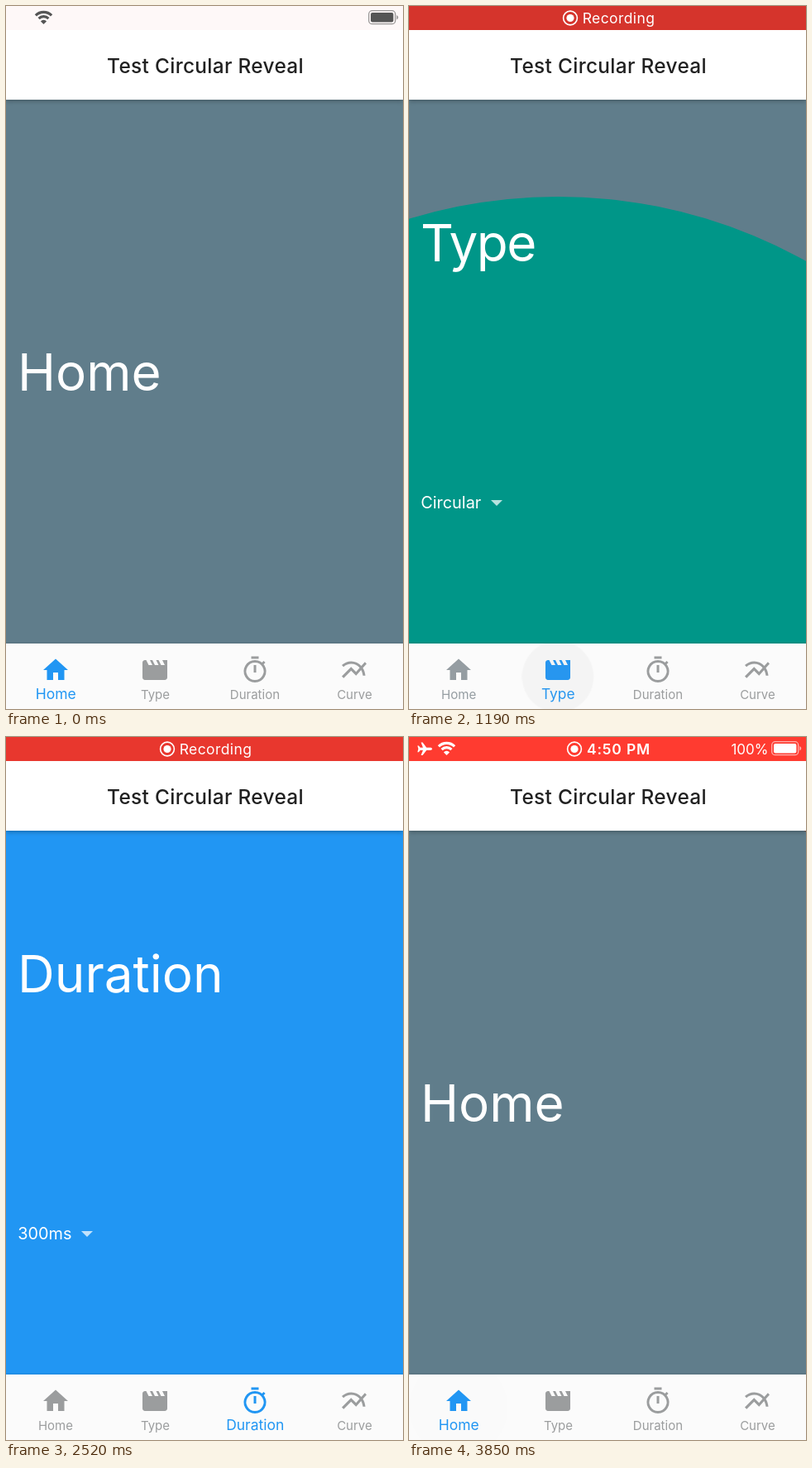
Animation of 480 by 848 pixels, one loop 3.92 s. Source, as an HTML page:

```html
<!DOCTYPE html>
<html lang="en">
<head>
<meta charset="utf-8">
<title>Test Circular Reveal</title>
<style>
@property --on { syntax: "<number>"; inherits: true; initial-value: 0; }

:root { --loop: 3920ms; --tap1: 1048ms; --tap2: 1889ms; --tap3: 2730ms; --tap4: 3570ms; }
html, body { margin: 0; width: 100%; height: 100%; overflow: hidden; background: #fff; }
body { font-family: Inter, Roboto, sans-serif; font-optical-sizing: none; }
#stage { position: relative; width: 480px; height: 848px; overflow: hidden; }

/* Pages */
.page { position: absolute; left: 0; top: 113px; width: 480px; height: 656px; color: #fff; background: var(--bg); }
.page h1, .page p { position: absolute; margin: 0; line-height: 0; font-weight: 400; white-space: nowrap; }
.page h1 { left: 14px; top: 173px; font-size: 62px; }
.page p { left: 14.2px; top: 486px; font-size: 19.9px; }
.page i { position: absolute; top: 483px; margin-left: -7.5px; border: 7.5px solid transparent; border-top-color: #ffffffb8; border-bottom: 0; }
.home { --bg: #607d8b; }
.home h1 { top: 329px; }
.type { --bg: #009688; }
.type h1 { letter-spacing: -1.6px; }
.duration { --bg: #2196f3; }
.curve { --bg: #795548; }
.reveal { animation: reveal var(--loop) var(--at) infinite both; }
@keyframes reveal {
  0% { clip-path: circle(0px at var(--x) 735px); animation-timing-function: ease; }
  7.65%, 30% { clip-path: circle(var(--r) at var(--x) 735px); }
  30.01%, 100% { clip-path: circle(0px at var(--x) 735px); }
}

/* Header */
header { position: absolute; left: 0; top: 0; width: 480px; height: 113px; background: #fff; box-shadow: 0 2px 5px #0004; }
header svg { position: absolute; left: 0; top: 0; }
header h2 { position: absolute; left: 1px; top: 72px; width: 100%; margin: 0; text-align: center;
  font-size: 24.4px; font-weight: 500; line-height: 0; letter-spacing: .32px; color: #212121; }
.bar { height: 29px; animation: pulse var(--loop) infinite ease-in-out, arrive var(--loop) infinite; }
.status { font-size: 17.5px; letter-spacing: .4px; }
.clock { font-weight: 600; letter-spacing: .8px; }
.percent { font-size: 17px; letter-spacing: 0; }
.status g, .status .fade { animation: var(--loop) infinite; }
.status .intro { animation-name: intro; }
.status .tint { animation-name: tint; }
.status .time { animation-name: time; }
.status .wifi { animation-name: wifi; }
.status .battery { animation-name: battery; }
.status .rec { animation-name: rec; }
.status .slide { animation-name: slide; animation-timing-function: ease-in-out; }
@keyframes pulse {
  0% { background: #de362d; }
  4.46%, 31.25%, 58.04%, 84.82% { background: #d5342c; }
  17.86%, 44.64%, 71.43%, 98.21% { background: #ff3b30; }
  100% { background: #fd3b30; }
}
@keyframes arrive { 0% { opacity: .03; } 7.65%, 100% { opacity: 1; } }
@keyframes intro { 0%, 1% { opacity: 0; } 8%, 100% { opacity: 1; } }
@keyframes tint { 0% { color: #555; } 7%, 100% { color: #fff; } }
@keyframes time { 0%, 21% { opacity: 1; } 25.5%, 81.5% { opacity: 0; } 85.5%, 100% { opacity: 1; } }
@keyframes wifi { 0%, 22% { opacity: 1; } 25.5%, 83.5% { opacity: 0; } 87.5%, 100% { opacity: 1; } }
@keyframes battery { 0%, 22% { opacity: 1; } 25.5%, 85.8% { opacity: 0; } 90%, 100% { opacity: 1; } }
@keyframes rec { 0%, 22% { opacity: 0; } 26%, 82% { opacity: 1; } 87.5%, 100% { opacity: 0; } }
@keyframes slide { 0%, 21% { transform: translateX(5px); } 26%, 82% { transform: none; } 86.5%, 100% { transform: translateX(5px); } }

/* Tabs */
nav { position: absolute; left: -.3px; top: 769px; width: 482px; height: 79px; display: flex; background: #fbfbfb; box-shadow: 0 0 3px #0003; }
.tab { position: relative; flex: none; width: 120.5px; height: 79px; overflow: hidden;
  color: color-mix(in srgb, #2196f3 calc(var(--on) * 100%), #9b9d9e);
  animation: pick var(--loop) var(--at) infinite both; }
.tab.first { animation: rest var(--loop) var(--tap1) infinite both; }
.tab::before { content: ""; position: absolute; left: -5px; top: -25px; width: 130px; height: 130px; border-radius: 50%;
  background: #0000000f; opacity: 0; animation: ripple var(--loop) var(--at) infinite; }
.tab svg { position: absolute; left: 42.2px; top: 14px; fill: currentColor; }
.tab span { position: absolute; left: 0; top: 62px; width: 100%; text-align: center; font-size: 15px; line-height: 0;
  transform: translateY(calc(-1px * var(--on))) scale(calc(1 + .167 * var(--on))); }
@keyframes pick { 0% { --on: 0; } 5.1%, 21.5% { --on: 1; } 26.6%, 100% { --on: 0; } }
@keyframes rest { 0% { --on: 1; } 5.1%, 64.4% { --on: 0; } 69.5%, 100% { --on: 1; } }
@keyframes ripple {
  0% { transform: scale(.3); opacity: 1; animation-timing-function: ease-out; }
  10%, 100% { transform: none; opacity: 0; }
}
</style>
</head>
<body>
<div id="stage">
  <section class="page home"><h1>Home</h1></section>
  <section class="page reveal type" style="--at: var(--tap1); --x: 180px; --r: 794px"><h1>Type</h1><p>Circular</p><i style="left: 106px"></i></section>
  <section class="page reveal duration" style="--at: var(--tap2); --x: 300px; --r: 794px"><h1>Duration</h1><p>300ms</p><i style="left: 98.5px"></i></section>
  <section class="page reveal curve" style="--at: var(--tap3); --x: 421px; --r: 847px"><h1>Curve</h1><p>Ease</p><i style="left: 167px"></i></section>
  <section class="page reveal home" style="--at: var(--tap4); --x: 60px; --r: 847px"><h1>Home</h1></section>

  <header>
    <div class="bar"></div>
    <svg class="status" width="480" height="29" fill="#fff">
      <g class="intro">
        <path class="fade time" d="M28 14.3c0-1-1-1.6-2.4-1.6h-4.4L16.5 6.6h-2l2.4 6.1h-3.3l-1.8-2.3h-1.5l1 3.9-1 3.9h1.5l1.8-2.3h3.3l-2.4 6.1h2l4.7-6.1h4.4c1.4 0 2.4-.6 2.4-1.6z"/>
        <g class="slide">
          <circle cx="195" cy="14.5" r="8.4" fill="none" stroke="#fff" stroke-width="1.6"/>
          <circle cx="195" cy="14.5" r="4.6"/>
          <text class="fade time clock" x="210" y="21">4:50 PM</text>
          <text class="fade rec" x="209.7" y="21">Recording</text>
        </g>
        <text class="fade battery percent" x="434.5" y="21" text-anchor="end">100%</text>
      </g>
      <g class="tint">
        <g class="wifi">
          <path d="M35.9 11.4a13.6 13.6 0 0 1 19.2 0M39.6 15.1a8.4 8.4 0 0 1 11.8 0" fill="none" stroke="currentColor" stroke-width="3.2"/>
          <path d="M45.5 22l-3.6-3.6a5 5 0 0 1 7.2 0z" fill="currentColor"/>
        </g>
        <g class="battery" fill="currentColor">
          <rect x="438.7" y="5.7" width="32" height="16" rx="4" fill="none" stroke="currentColor" stroke-width="1.3" stroke-opacity=".6"/>
          <rect x="441" y="8" width="27.4" height="11.4" rx="2"/>
          <path d="M472.3 11v5.6q2-1 2-2.8t-2-2.8z" opacity=".6"/>
        </g>
      </g>
    </svg>
    <h2>Test Circular Reveal</h2>
  </header>

  <nav>
    <div class="tab first" style="--at: var(--tap4)">
      <svg width="36" height="36" viewBox="0 0 24 24"><path d="M10 20v-6h4v6h5v-8h3L12 3 2 12h3v8z"/></svg><span>Home</span>
    </div>
    <div class="tab" style="--at: var(--tap1)">
      <svg width="36" height="36" viewBox="0 0 24 24"><path d="M18 4l2 4h-3l-2-4h-2l2 4h-3l-2-4H8l2 4H7L5 4H4c-1.1 0-2 .9-2 2v12c0 1.1.9 2 2 2h16c1.1 0 2-.9 2-2V4z"/></svg><span>Type</span>
    </div>
    <div class="tab" style="--at: var(--tap2)">
      <svg width="36" height="36" viewBox="0 0 24 24"><path d="M9 1h6v2H9zM11 8h2v6h-2z"/><path d="M12 5a8 8 0 1 0 .01 0zM17.5 7.5l2.2-2.2" fill="none" stroke="currentColor" stroke-width="2"/></svg><span>Duration</span>
    </div>
    <div class="tab" style="--at: var(--tap3)">
      <svg width="36" height="36" viewBox="0 0 24 24"><path d="M22 6.92l-1.41-1.41-2.85 3.21C15.68 6.4 12.83 5 9.61 5 6.72 5 4.07 6.16 2 8l1.42 1.42C5.12 7.93 7.27 7 9.61 7c2.74 0 5.09 1.26 6.77 3.24l-2.88 3.24-4-4L2 16.99l1.5 1.5 6-6.01 4 4 4.05-4.55c.75 1.35 1.25 2.9 1.44 4.55H21c-.22-2.3-.95-4.39-2.04-6.14z"/></svg><span>Curve</span>
    </div>
  </nav>
</div>
</body>
</html>
```
